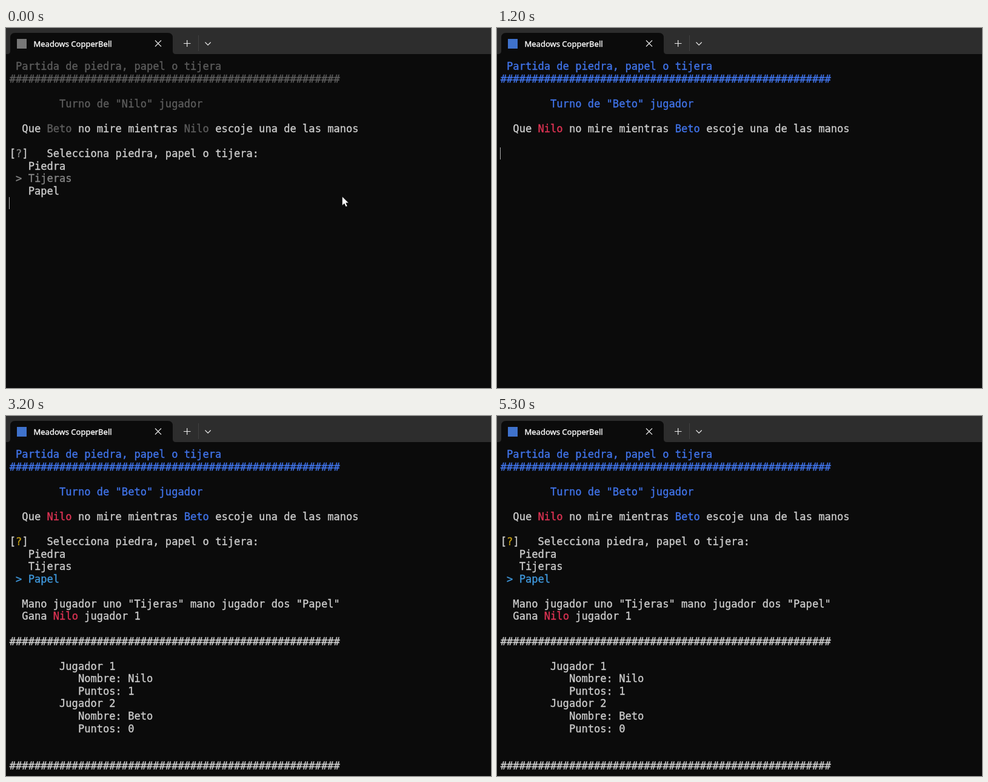
These frames come from a looping animation (800x594 px, 5.4 s). An HTML page:

```html
<!DOCTYPE html>
<html lang="es">
<head>
<meta charset="utf-8">
<title>Piedra, papel o tijera</title>
<style>
  html, body { margin: 0; height: 100%; overflow: hidden; background: #0b0b0b; }
  svg { display: block; width: 100vw; height: 100vh; }
  text { white-space: pre; }
  text, tspan { fill: currentColor; stroke: currentColor; stroke-width: .35px; }
  #screen { font: 17.08px "DejaVu Sans Mono", monospace; color: #ccc; }
  #tab { font: 500 13px "Noto Sans", sans-serif; color: #fff; }
  .blue { color: #4074ea; }
  .red { color: #dc3353; }
  .cyan { color: #3f98dc; }
  .yellow { color: #c19c14; }
  .gray .blue, .gray .red { color: #5c5c5c; }
  .gray .cyan, .gray .yellow { color: #858585; }
</style>
</head>
<body>
<svg viewBox="0 0 800 594">
  <rect width="800" height="594" fill="#0b0b0b"/>
  <rect width="800" height="43" fill="#2d2d2d"/>
  <path d="M2 43Q7 43 7 38V16Q7 8 15 8H267Q275 8 275 16V38Q275 43 280 43Z" fill="#0b0b0b"/>
  <rect id="icon" x="18" y="18" width="16" height="16"/>
  <text id="tab" x="45.5" y="31">Meadows CopperBell</text>
  <path d="M317.5 12V38" stroke="#404040"/>
  <path d="M246 20.5l10 10m0-10l-10 10M293 25.5h11.5M298.7 20v11M328.5 23.5l4.6 4.6l4.6-4.6"
        fill="none" stroke="#e8e8e8" stroke-width="1.2"/>
  <g id="screen"></g>
  <path id="pointer" d="M554.5 278v15l3.5-3.3l2.5 5.3l2.6-1.1l-2.4-5.2h4.6z"
        fill="#fff" stroke="#000" stroke-width=".6"/>
</svg>
<script>
const LOOP = 5400, ROW = 20.57, LEFT = 5.8;
const HIDE_POINTER = 100, CLEAR = 1000, CURSOR = 1200, MENU = 1300,
      SECOND = 1800, THIRD = 2600, RESULT = 3200;
const ONE = "Nilo", TWO = "Beto";
const RULE = "#".repeat(53);
const OPTIONS = ["Piedra", "Tijeras", "Papel"];
const get = id => document.getElementById(id);

const paint = (color, s) => `<tspan class="${color}">${s}</tspan>`;
const line = (row, s) => `<text x="${LEFT}" y="${69 + row * ROW}">${s}</text>`;
const caret = row =>
  `<rect x="5" y="${Math.round(53 + row * ROW)}" width="1" height="20" fill="#aaa"/>`;

function header(firstTurn) {
  const [player, other] = firstTurn ? [ONE, TWO] : [TWO, ONE];
  const [color, otherColor] = firstTurn ? ["red", "blue"] : ["blue", "red"];
  return line(0, paint(color, " Partida de piedra, papel o tijera"))
    + line(1, paint(color, RULE))
    + line(3, paint(color, `        Turno de "${player}" jugador`))
    + line(5, `  Que ${paint(otherColor, other)} no mire mientras ${paint(color, player)} escoje una de las manos`);
}

function menu(selected) {
  return line(7, `[${paint("yellow", "?")}]   Selecciona piedra, papel o tijera:`)
    + OPTIONS.map((name, i) =>
        line(8 + i, i === selected ? paint("cyan", " &gt; " + name) : "   " + name)).join("");
}

function score(row, number, name, points) {
  return line(row, `        Jugador ${number}`)
    + line(row + 1, `           Nombre: ${name}`)
    + line(row + 2, `           Puntos: ${points}`);
}

function result() {
  return line(12, '  Mano jugador uno "Tijeras" mano jugador dos "Papel"')
    + line(13, `  Gana ${paint("red", ONE)} jugador 1`)
    + line(15, RULE)
    + score(17, 1, ONE, 1) + score(20, 2, TWO, 0)
    + line(25, RULE);
}

function terminal(t) {
  if (t < CLEAR) return header(true) + menu(1) + caret(11);
  if (t < CURSOR) return header(false);
  if (t < MENU) return header(false) + caret(7);
  const selected = t < SECOND ? 0 : t < THIRD ? 1 : 2;
  return header(false) + menu(selected) + (t < RESULT ? caret(11) : result());
}

let shown = "";
function draw() {
  const t = performance.now() % LOOP;
  const markup = terminal(t);
  if (markup !== shown) get("screen").innerHTML = shown = markup;
  get("screen").setAttribute("class", t < CLEAR ? "gray" : "");
  get("icon").setAttribute("fill", t < CLEAR ? "#777" : "#3f72cc");
  get("pointer").style.display = t < HIDE_POINTER ? "" : "none";
  requestAnimationFrame(draw);
}
draw();
</script>
</body>
</html>
```
